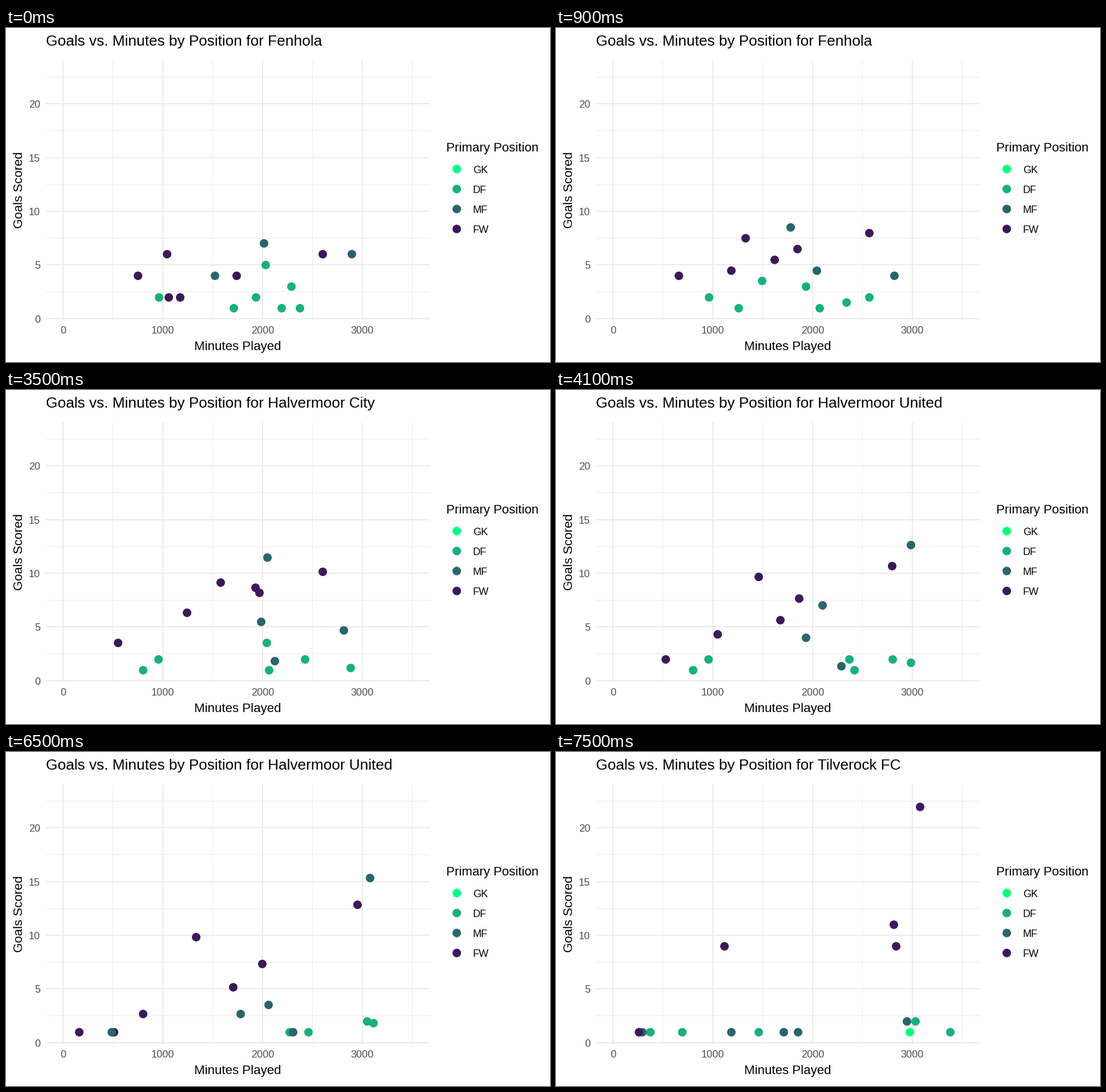
These frames come from a looping animation (954 by 587 pixels, 8 s). A matplotlib script:

```python
from itertools import zip_longest
from math import floor

import matplotlib.pyplot as plt
from matplotlib.animation import FuncAnimation

W, H, DPI = 954, 587, 64
LEFT, RIGHT, TOP, BOTTOM = 70, 743, 56.5, 513
FIRST, STEP, STEPS, CYCLE = 500, 200, 6, 3000
DOT = 15

COLORS = {"GK": "#00ff7f", "DF": "#15b27a", "MF": "#28656c", "FW": "#3b195b"}

# Players as (minutes, goals); minutes alone mean a single goal.
# Those at the same place in two clubs' lists move into one another.
CLUBS = {
    "Fenhola": {
        "DF": [(1934, 2), 2191, 2374, (2286, 3), 1709, (2029, 5), (963, 2)],
        "MF": [(1520, 4), (2011, 7), (2889, 6)],
        "FW": [(1057, 2), (1040, 6), (1171, 2), (1740, 4), (2600, 6), (751, 4)],
    },
    "Halvermoor City": {
        "DF": [(1934, 4), 1946, (2300, 2), 2843, 803, (954, 2)],
        "MF": [(2029, 13), (2069, 2), (2751, 2), (2000, 6)],
        "FW": [(1309, 7), (1617, 9), (2063, 9), (1949, 9), (2537, 10), (558, 4)],
    },
    "Halvermoor United": {
        "DF": [2583, 2654, (3046, 2), (3055, 2)],
        "MF": [(2129, 4), 2391, (3100, 18), (1897, 3), 526],
        "FW": [(911, 3), (1377, 10), (1483, 4), (1823, 7), (2920, 11), 509, 160],
    },
    "Tilverock FC": {
        "DF": [694, 1457, (3029, 2), 3380, 374],
        "MF": [1706, 1854, (2943, 2), 1183, 294],
        "FW": [257, (1117, 9), (2811, 11), (2837, 9), (3077, 22)],
        "GK": [2971],
    },
}
NAMES, SQUADS = list(CLUBS), list(CLUBS.values())

plt.rcParams["font.family"] = "Liberation Sans"


def px(minutes):
    return floor(100.47 + 0.175 * minutes)


def py(goals):
    return floor(511 - 18.86 * goals)


def pt(pixels):
    return pixels * 72 / DPI


def stats(player):
    return player if isinstance(player, tuple) else (player, 1)


fig = plt.figure(figsize=(W / DPI, H / DPI), dpi=DPI, facecolor="white")
ax = fig.add_axes([0, 0, 1, 1])
ax.set_xlim(0, W)
ax.set_ylim(H, 0)
ax.axis("off")


def label(x, y, text, size, color="black", ha="left", **kw):
    return ax.text(x, y, text, fontsize=pt(size), color=color,
                   ha=ha, va="baseline", **kw)


def rule(xs, ys, width):
    ax.plot(xs, ys, color="#ebebeb", lw=pt(width), solid_capstyle="butt",
            snap=True, zorder=width)


def dots(xs, ys, colors):
    return ax.scatter(xs, ys, s=pt(DOT) ** 2, c=colors, linewidths=0, zorder=5)


# Grid and tick labels
for i in range(8):
    x, major = px(500 * i), i % 2 == 0
    rule([x, x], [TOP, BOTTOM], 2 if major else 1)
    if major:
        label(x, 537, str(500 * i), 18, "#4d4d4d", "center")
for i in range(10):
    y, major = py(2.5 * i), i % 2 == 0
    rule([LEFT, RIGHT], [y, y], 2 if major else 1)
    if major:
        label(60, y + 7, str(5 * i // 2), 18, "#4d4d4d", "right")

# Titles and legend
title = label(LEFT, 31, "", 26.2)
label((LEFT + RIGHT) / 2, 566, "Minutes Played", 22.2, ha="center")
label(28.7, (TOP + BOTTOM) / 2, "Goals Scored", 22.2, ha="center",
      rotation=90, rotation_mode="anchor")
label(772.5, 217, "Primary Position", 22.2)
rows = [247.9 + 35.1 * i for i in range(len(COLORS))]
dots([790.5] * len(rows), rows, list(COLORS.values()))
for y, name in zip(rows, COLORS):
    label(819, y + 7, name, 18)

points = dots([0], [0], ["white"])


def placed(leg, step):
    """Dots on show as (x, y, color); leaving dots lie underneath."""
    leaving, moving = [], []
    for pos in ("DF", "MF", "FW", "GK"):
        pairs = zip_longest(SQUADS[leg].get(pos, []),
                            SQUADS[leg + 1].get(pos, []))
        for old, new in pairs:
            if old is None and step < STEPS or new is None and step == STEPS:
                continue
            start, end = stats(old or new), stats(new or old)
            m, g = (a + (b - a) * step / STEPS for a, b in zip(start, end))
            layer = leaving if new is None else moving
            layer.append((px(m) + 0.5, py(g) + 0.5, COLORS[pos]))
    return leaving + moving


def update(frame):
    t = frame * 100
    leg = min((t - FIRST - STEP * (STEPS - 1)) // CYCLE + 1, len(NAMES) - 2)
    step = (t - FIRST - CYCLE * leg) // STEP + 1
    step = max(0, min(STEPS, step))
    *xy, colors = zip(*placed(leg, step))
    points.set_offsets(list(zip(*xy)))
    points.set_facecolors(colors)
    club = NAMES[leg + (step > STEPS // 2)]
    title.set_text(f"Goals vs. Minutes by Position for {club}")
    return points, title


anim = FuncAnimation(fig, update, frames=80, interval=100, repeat=True,
                     repeat_delay=0, init_func=lambda: update(0))
plt.show()
```
